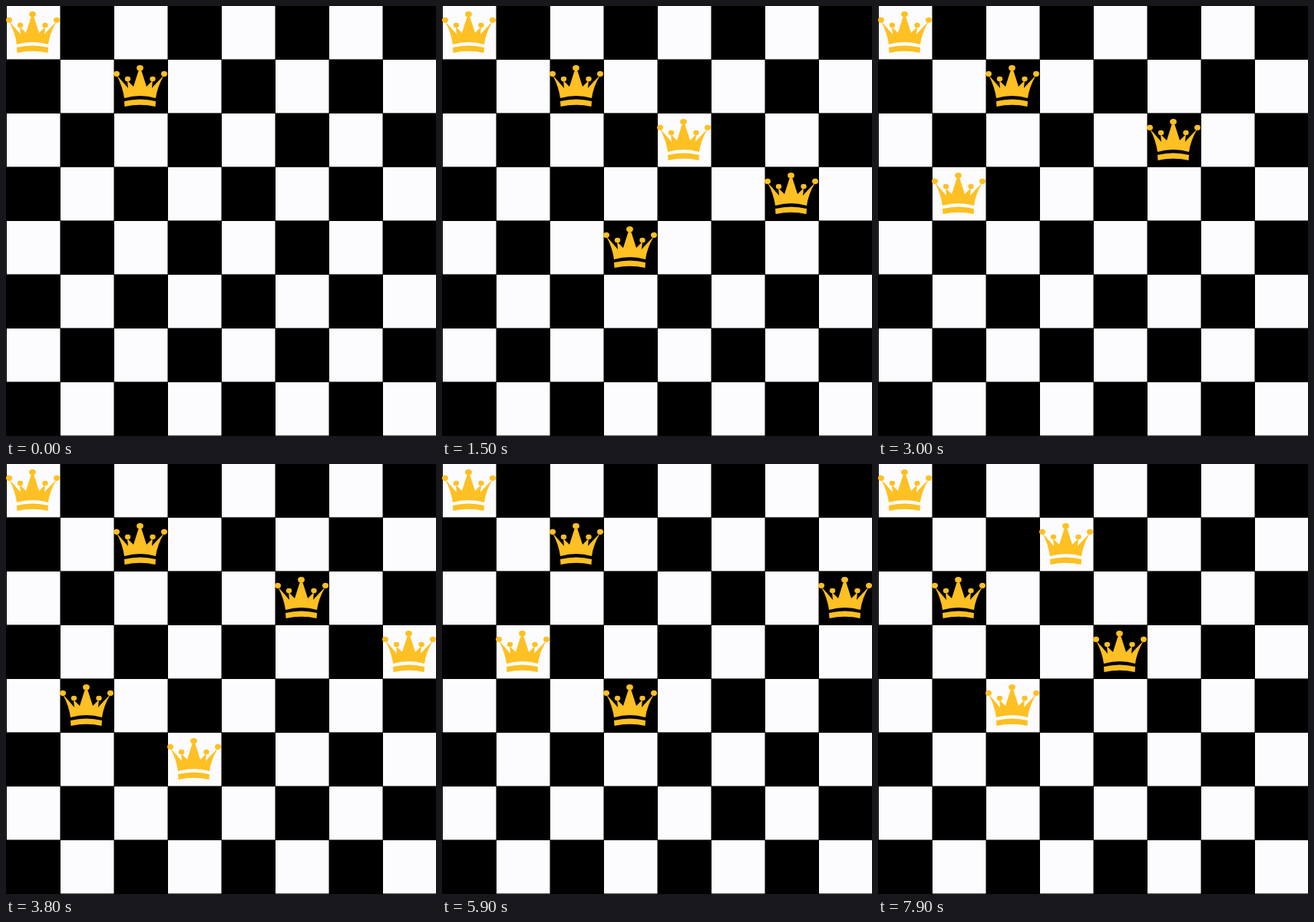
These frames come from a looping animation (560x560 px, 8000 ms). An HTML page with a canvas:

```html
<!DOCTYPE html>
<html lang="en">
<head>
<meta charset="utf-8">
<title>Eight queens by backtracking</title>
<style>
html, body { margin: 0; width: 100%; height: 100%; overflow: hidden; background: #000; }
canvas { display: block; }
</style>
</head>
<body>
<canvas width="560" height="560"></canvas>
<script>
const N = 8, CELL = 70, STEP = 100, STEPS = 80;
const ctx = document.querySelector("canvas").getContext("2d");

// Every placement and every removal of the search is one step.
const states = [];
const isSafe = (queens, col) => queens.every((c, row) =>
  c !== col && Math.abs(c - col) !== queens.length - row);

function search(queens) {
  if (queens.length === N) return true;
  for (let col = 0; col < N; col++) {
    if (!isSafe(queens, col)) continue;
    const next = [...queens, col];
    states.push(next);
    if (search(next)) return true;
    states.push(queens);
  }
  return false;
}
search([]);
states.shift(); // the loop starts with two queens on the board

const crown = new Path2D(`
  M4 20 Q15 32 19 37 L18 27 L26 35 L33 13 L36 13 L43 35 L51 27 L50 37
  Q54 32 66 20 Q57 35 55 50 Q35 44 14 50 Q12 35 4 20Z
  M14 54 Q35 49 55 54 L54.5 61 Q35 56.5 14.5 61Z`);
for (const [x, y, rx, ry] of [[4, 18.3, 4, 3.6], [18.5, 25, 3.7, 3.3],
  [34.5, 10.8, 4.4, 3.7], [51, 25, 3.7, 3.3], [66, 18.3, 4, 3.6]]) {
  const ball = new Path2D();
  ball.ellipse(x, y, rx, ry, 0, 0, 2 * Math.PI);
  crown.addPath(ball);
}

function draw(queens) {
  ctx.fillStyle = "#000";
  ctx.fillRect(0, 0, 560, 560);
  ctx.fillStyle = "#fcfcfe";
  for (let row = 0; row < N; row++)
    for (let col = row % 2; col < N; col += 2)
      ctx.fillRect(col * CELL + 1, row * CELL, 69.5, 69.4);
  ctx.fillStyle = "#fec022";
  queens.forEach((col, row) => {
    ctx.save();
    ctx.translate(col * CELL, row * CELL);
    ctx.fill(crown);
    ctx.restore();
  });
}

const start = performance.now();
function tick() {
  const step = Math.floor((performance.now() - start) / STEP) % STEPS;
  draw(states[step]);
  requestAnimationFrame(tick);
}
tick();
</script>
</body>
</html>
```
